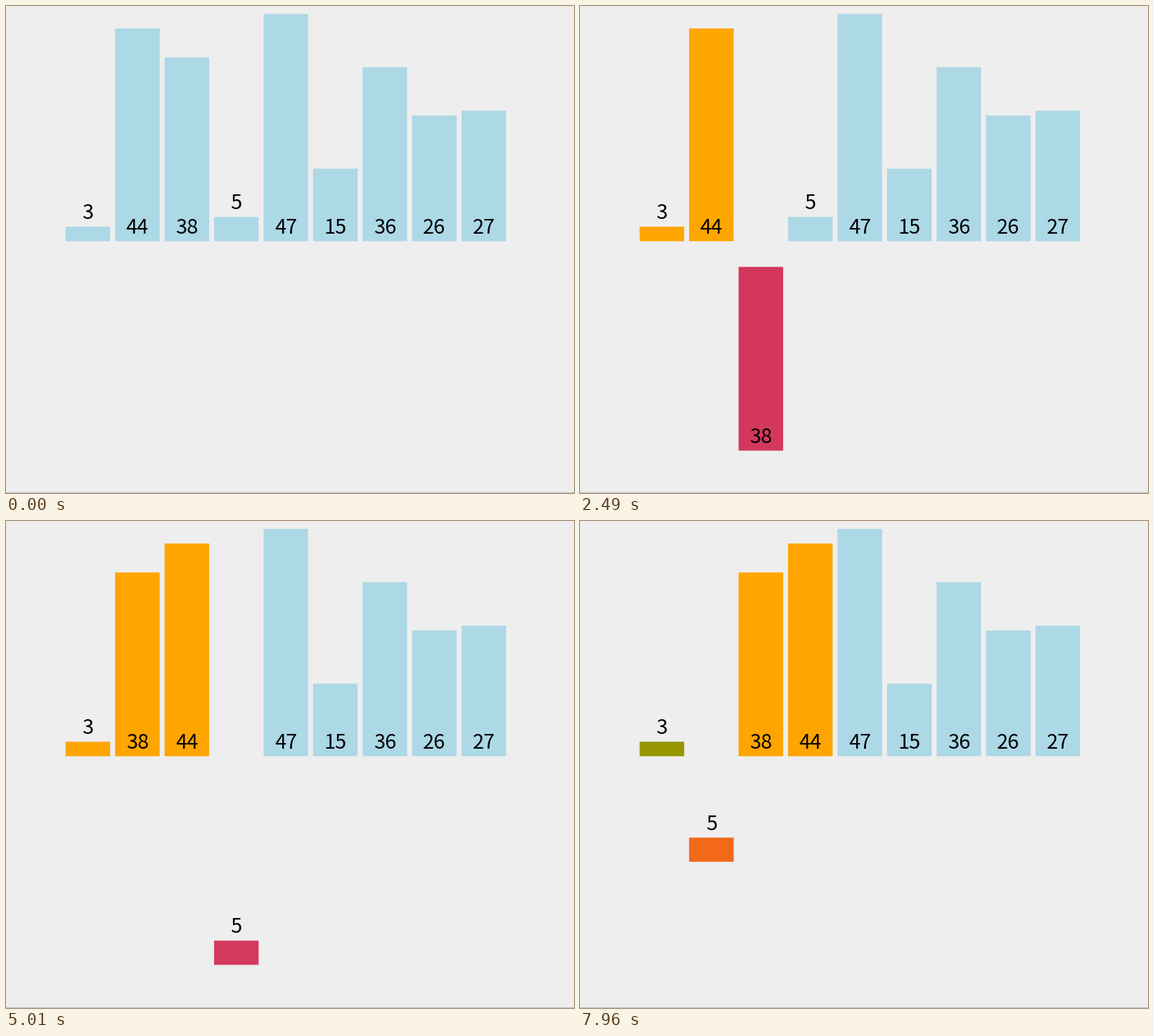
Recreate the animation shown at these times as a matplotlib script. Size 808 by 693 pixels, loop 8 s.

```python
import math

import matplotlib.pyplot as plt
import numpy as np
from matplotlib.animation import FuncAnimation
from matplotlib.patches import Rectangle

W, H, DPI = 808, 693, 100
LOOP, STEP = 8000, 20
VALUES = [3, 44, 38, 5, 47, 15, 36, 26, 27]

X0, PITCH, BAR_W = 84.8, 70.4, 63.36
BASE, UNIT, DROP = 334.7, 6.88, 366
LABEL_GAP = 11

# All times in ms: a transition starts every BEAT, the display refreshes every TICK
FIRST_BEAT, BEAT, EASE_MS = 280.9, 500.92, 300
FIRST_TICK, TICK = 364, 78.25

BLUE = (173, 216, 230)
ORANGE = (255, 165, 0)
GREEN = (0, 128, 0)
RED = (220, 20, 60)


def pose(slot, depth, color):
    return np.array([slot, depth, *color], float)


def insertion_sort(values):
    """Yield, step by step, the new pose of every bar that changes."""
    a = list(values)
    yield {a[0]: pose(0, 0, ORANGE)}
    for i in range(1, len(a)):
        key, j, released = a[i], i - 1, {}
        yield {key: pose(i, 1, RED)}
        while j >= 0:
            v = a[j]
            yield {**released, v: pose(j, 0, GREEN)}
            if v <= key:
                yield {v: pose(j, 0, ORANGE), key: pose(j + 1, 0, ORANGE)}
                break
            yield {v: pose(j + 1, 0, GREEN), key: pose(j, 1, RED)}
            released = {v: pose(j + 1, 0, ORANGE)}
            a[j + 1] = v
            j -= 1
        a[j + 1] = key


def ease(t):
    t = min(max(t, 0), 1)
    return 4 * t**3 if t < 0.5 else 1 - 4 * (1 - t) ** 3


def refreshed(t):
    """Time of the latest display refresh."""
    return FIRST_TICK + TICK * math.floor((t - FIRST_TICK) / TICK)


MOVES = list(insertion_sort(VALUES))


def state_at(t):
    state = {v: pose(i, 0, BLUE) for i, v in enumerate(VALUES)}
    for k, moves in enumerate(MOVES):
        elapsed = t - FIRST_BEAT - k * BEAT
        if elapsed <= 0:
            break
        p = ease(elapsed / EASE_MS)
        for v, goal in moves.items():
            state[v] = state[v] + (goal - state[v]) * p
    return state


fig = plt.figure(figsize=(W / DPI, H / DPI), dpi=DPI, facecolor="#eeeeee")
ax = fig.add_axes([0, 0, 1, 1])
ax.set_xlim(0, W)
ax.set_ylim(H, 0)
ax.axis("off")
ax.add_patch(Rectangle((0, H - 1), W, 1, fc="#bbbbbb", lw=0))

bars, labels = {}, {}
for v in VALUES:
    bars[v] = ax.add_patch(
        Rectangle((0, 0), BAR_W, v * UNIT, lw=0, snap=False, zorder=2))
    labels[v] = ax.text(0, 0, str(v), ha="center", va="baseline", zorder=3,
                        family="Noto Sans CJK JP", size=29 * 72 / DPI,
                        color="black")


def draw(frame):
    now = refreshed((frame + 0.5) * STEP)
    for v, (slot, depth, *rgb) in state_at(now).items():
        x = X0 + slot * PITCH
        bottom = BASE + depth * DROP
        top = bottom - v * UNIT
        bars[v].set_xy((x, top))
        bars[v].set_facecolor([c / 255 for c in rgb])
        anchor = top if v < 10 else bottom
        labels[v].set_position((x + BAR_W / 2, anchor - LABEL_GAP))
    return [*bars.values(), *labels.values()]


anim = FuncAnimation(fig, draw, frames=LOOP // STEP, interval=STEP,
                     repeat=True, repeat_delay=0, blit=False)
plt.show()
```
